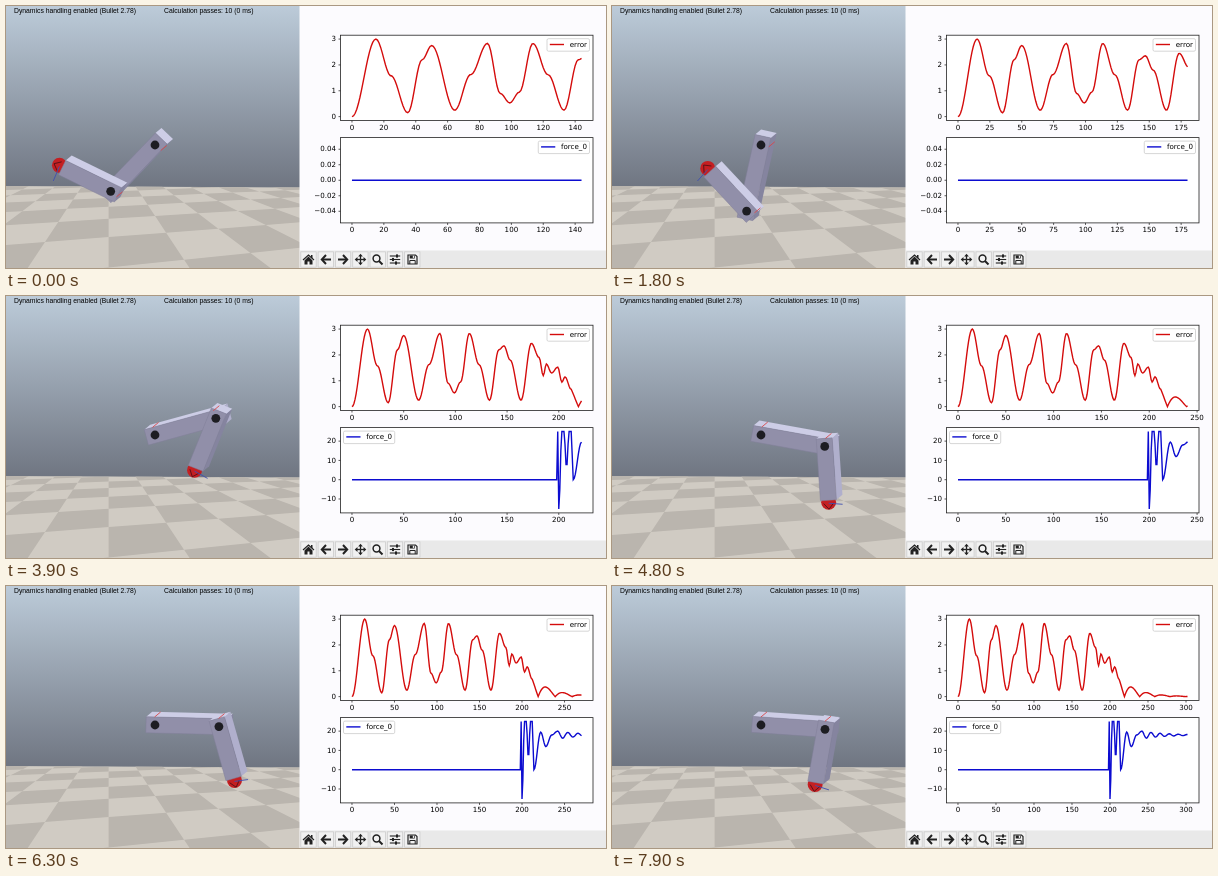
Animation of 600x262 px, one loop 8 s. Source, as an HTML page with a canvas:

```html
<!DOCTYPE html>
<html>
<head>
<meta charset="utf-8">
<style>
html, body { margin: 0; width: 600px; height: 262px; overflow: hidden; }
canvas { display: block; }
</style>
</head>
<body>
<canvas id="stage" width="600" height="262"></canvas>
<script>
const c = document.getElementById('stage').getContext('2d');
const TAU = 2 * Math.PI, PLOT_FONT = '7.1px "DejaVu Sans", sans-serif';

// Cosine easing through turning points, given as x, y pairs.
const swingThrough = (...p) => x => {
  let i = 0;
  while (i < p.length - 4 && p[i + 2] <= x) i += 2;
  const s = Math.min(1, (x - p[i]) / (p[i + 2] - p[i]));
  return p[i + 1] + (p[i + 3] - p[i + 1]) * (1 - Math.cos(s * TAU / 2)) / 2;
};
const ringing = (x, size, decay, period) => size * Math.exp(-x / decay) * Math.cos(TAU * x / period);

// Signed error of the first joint in radians: it swings freely, then rings out.
const freeError = swingThrough(
  0, 0, 15, 3, 24.5, 1.58, 35, .15, 44, 2.2, 50, 2.75, 64.5, .25, 74.5, 1.63, 85, 2.83, 93, .9,
  99, .53, 105, .95, 113.5, 2.83, 123, 1.62, 133, .25, 142, 2.2, 147, 2.35, 153, 1.8, 163.5, .25,
  173.5, 2.45, 181, 1.9, 185, 1.2, 188, 1.65, 193, 1.3, 199, 1.53, 203, .95, 206, 1.15, 212, .67
);
const angleError = n => n < 212 ? freeError(n) : ringing(n - 229, -.36, 23, 40);

const firstForce = swingThrough(
  198, 0, 199, 25, 200, -15.2, 203, 25, 205, 25, 207.5, 6, 210, 25, 212, 25, 214, 0,
  222, 19.5, 228, 12, 235, 18, 242, 20
);
const force = n => n < 198 ? 0 : n < 242 ? firstForce(n) : 18 + ringing(n - 242, 2, 30, 12);

const samples = f => Array.from({ length: 303 }, (_, n) => f(n));
const errors = samples(n => Math.abs(angleError(n))), forces = samples(force);

// Direction of the second link in degrees.
const freeSwing = swingThrough(0, 206, 250, 228, 1100, -35, 1800, 227, 2250, -20, 2900, 164, 3110, 70, 3325, 126);
const linkAngle = t => t < 3325 ? freeSwing(t) : 89 + ringing(t - 5600, -20, 4000, 650);

function path(points, close) {
  c.beginPath();
  points.forEach(p => c.lineTo(p[0], p[1]));
  if (close) c.closePath();
}
function poly(color, ...points) {
  path(points, true);
  c.fillStyle = color;
  c.fill();
}
function line(color, width, ...points) {
  path(points);
  c.strokeStyle = color;
  c.lineWidth = width;
  c.stroke();
}
function disc(color, x, y, r) {
  c.beginPath();
  c.arc(x, y, r, 0, TAU);
  c.fillStyle = color;
  c.fill();
}
function rect(color, x, y, w, h) {
  c.fillStyle = color;
  c.fillRect(x, y, w, h);
}
function label(text, x, y, align = 'left', font = PLOT_FONT) {
  c.font = font;
  c.textAlign = align;
  c.fillStyle = '#000';
  c.fillText(text, x, y);
}

function drawRoom() {
  const sky = c.createLinearGradient(0, 0, 0, 182);
  sky.addColorStop(0, '#bccbd9');
  sky.addColorStop(1, '#6f7581');
  rect(sky, 0, 0, 294, 262);

  c.save();
  path([[0, 180], [294, 181.5], [294, 262], [0, 262]], true);
  c.clip();
  rect('#d0cbc3', 0, 178, 294, 84);
  const depth = (i, j) => i * .2 + j * .98;
  const spot = (i, j) => [150 + 232 * (i * .98 - j * .2) / depth(i, j), 140 + 357 / depth(i, j)];
  for (let j = -2; j < 14; j++)
    for (let i = -10; i < 13; i++)
      if ((i + j) % 2 && depth(i, j) > 1)
        poly('#bab5ae', spot(i, j), spot(i + 1, j), spot(i + 1, j + 1), spot(i, j + 1));
  c.restore();

  const small = '6.8px "Liberation Sans", Arial, sans-serif';
  label('Dynamics handling enabled (Bullet 2.78)', 8, 6.7, 'left', small);
  label('Calculation passes: 10 (0 ms)', 158, 6.7, 'left', small);
}

const DEPTH = [6, -5];
const back = ([x, y]) => [x + DEPTH[0], y + DEPTH[1]];

// A box along a to b, seen slightly from above and from the right.
function box(a, b, before, after, half) {
  const len = Math.hypot(b[0] - a[0], b[1] - a[1]);
  const ux = (b[0] - a[0]) / len, uy = (b[1] - a[1]) / len;
  const at = (p, along, side) => [p[0] + ux * along - uy * side, p[1] + uy * along + ux * side];
  const corners = [at(a, -before, -half), at(b, after, -half), at(b, after, half), at(a, -before, half)];
  corners.forEach((p, i) => {
    const q = corners[(i + 1) % 4];
    const nx = q[1] - p[1], ny = p[0] - q[0];
    if (nx * DEPTH[0] + ny * DEPTH[1] > 0) {
      const up = -ny / Math.hypot(nx, ny);
      poly(up > .5 ? '#cdcde6' : up > 0 ? '#b0afcc' : '#85849f', p, q, back(q), back(p));
    }
  });
  poly('#918fa9', ...corners);
  line('#807e99', .5, ...corners, corners[0]);
}

function drawArm(t, n) {
  const a1 = angleError(n + 2), a2 = linkAngle(t) * TAU / 360;
  const base = [149, 139];
  const elbow = [149 + 64 * Math.cos(a1), 139 + 5 * Math.cos(a1) + 69 * Math.sin(a1)];
  const ux = Math.cos(a2), uy = Math.sin(a2);
  const along = d => [elbow[0] + d * ux, elbow[1] + d * uy];
  const tip = along(57);

  disc('#c41f22', tip[0], tip[1] - 1, 7.5);
  line('#401015', .8, [tip[0] - 5 * uy, tip[1] + 5 * ux],
    [tip[0] + 6 * ux, tip[1] + 6 * uy], [tip[0] + 5 * uy, tip[1] - 5 * ux]);
  box(base, elbow, 9, 8, 8);
  box(elbow, along(54), 8, 0, 8);
  line('#4050b0', .9, tip, [tip[0] + 14 * uy, tip[1] - 14 * ux + 2]);
  for (const [x, y] of [base, elbow]) {
    const edge = [x + 8 * Math.sin(a1), y - 8 * Math.cos(a1)];
    line('#d84848', .9, edge, back(edge));
    disc('#1d1d22', x, y, 4.4);
  }
}

function ticks(lo, hi, bins) {
  const raw = (hi - lo) / bins, mag = 10 ** Math.floor(Math.log10(raw));
  const step = mag * [1, 2, 2.5, 5, 10].find(s => s * mag >= raw);
  const list = [];
  for (let k = Math.ceil(lo / step); k * step <= hi; k++) list.push(k * step);
  return list;
}

function drawPlot(top, data, n, color, name, legendLeft) {
  const L = 334.5, W = 252.5, H = 85.3;
  const seen = data.slice(0, n + 1);
  let lo = Math.min(...seen), hi = Math.max(...seen);
  if (lo === hi) { lo -= .05; hi += .05; }
  const pad = (hi - lo) * .05;
  lo -= pad;
  hi += pad;
  const px = x => L + W * (x / n + .05) / 1.1;
  const py = y => top + H * (hi - y) / (hi - lo);

  rect('#fff', L, top, W, H);
  line(color, 1.4, ...seen.map((v, i) => [px(i), py(v)]));
  for (const v of ticks(-n * .05, n * 1.05, 9)) {
    line('#111', .7, [px(v), top + H], [px(v), top + H + 2]);
    label(v, px(v), top + H + 9.3, 'center');
  }
  for (const v of ticks(lo, hi, 6)) {
    line('#111', .7, [L - 2, py(v)], [L, py(v)]);
    label((hi < 1 ? v.toFixed(2) : String(Math.round(v))).replace('-', '\u2212'), L - 4.5, py(v) + 2.1, 'right');
  }
  c.strokeStyle = '#222';
  c.lineWidth = .8;
  c.strokeRect(L, top, W, H);

  c.font = PLOT_FONT;
  const w = 25.3 + c.measureText(name).width;
  const x = legendLeft ? L + 3 : L + W - 3.5 - w;
  c.beginPath();
  c.roundRect(x, top + 3.5, w, 12.5, 1.5);
  c.fillStyle = 'rgba(255,255,255,.8)';
  c.fill();
  c.strokeStyle = '#ccc';
  c.stroke();
  line(color, 1.4, [x + 2.8, top + 9.3], [x + 17, top + 9.3]);
  label(name, x + 22.7, top + 11.6);
}

function drawToolbar() {
  rect('#e9e9e9', 294, 244.5, 306, 18);
  const ink = '#222';
  const icon = (x, turn, draw) => {
    c.save();
    c.translate(x, 253.5);
    c.rotate(turn * TAU / 4);
    draw();
    c.restore();
  };
  for (let i = 0; i < 7; i++) {
    rect('#c9c9c9', 294.5 + i * 17.3, 245.5, 16, 16);
    rect('#f1f1f1', 295.2 + i * 17.3, 246.2, 14.6, 14.6);
  }
  icon(302.5, 0, () => {
    poly(ink, [-4, 1], [-4, 5], [-1, 5], [-1, 2], [1, 2], [1, 5], [4, 5], [4, 1], [0, -3]);
    line(ink, 1.2, [-5.5, .5], [0, -4.5], [5.5, .5]);
    rect(ink, 2.5, -4.5, 1.5, 3);
  });
  for (const turn of [0, 2])
    icon(320 + turn * 8.5, turn, () => {
      line(ink, 2, [-4, 0], [5, 0]);
      line(ink, 2, [0, -4.5], [-4.2, 0], [0, 4.5]);
    });
  for (let turn = 0; turn < 4; turn++)
    icon(354.5, turn, () => {
      line(ink, 1.3, [0, 0], [4, 0]);
      poly(ink, [3, -2.4], [5.8, 0], [3, 2.4]);
    });
  icon(371.5, 0, () => {
    c.beginPath();
    c.arc(-1, -1, 3.4, 0, TAU);
    c.strokeStyle = ink;
    c.lineWidth = 1.5;
    c.stroke();
    line(ink, 2, [1.5, 1.5], [5, 5]);
  });
  icon(389, 0, () => [[-3.5, 2], [0, -2], [3.5, 1]].forEach(([row, knob]) => {
    line(ink, 1.1, [-5.2, row], [5.2, row]);
    rect(ink, knob - 1, row - 1.6, 2, 3.2);
  }));
  icon(406.5, 0, () => {
    line(ink, 1.2, [-4.5, -4.5], [3, -4.5], [4.5, -3], [4.5, 4.5], [-4.5, 4.5], [-4.5, -5]);
    rect(ink, -2.8, -4, 5, 3);
    rect('#f1f1f1', .3, -3.8, 1.2, 2.2);
    line(ink, 1, [-2.7, 4.5], [-2.7, 1], [2.7, 1], [2.7, 4.5]);
  });
}

function draw(now) {
  const step = Math.floor(now % 8000 / 100), n = 144 + 2 * step;
  drawRoom();
  drawArm(step * 100, n);
  rect('#fcfbfe', 293.5, 0, 307, 262);
  drawPlot(29.2, errors, n, '#d40c0c', 'error', false);
  drawPlot(131.6, forces, n, '#0c0cd0', 'force_0', n > 198);
  drawToolbar();
}

const start = performance.now();
function frame() {
  draw(performance.now() - start);
  requestAnimationFrame(frame);
}
frame();
</script>
</body>
</html>
```
